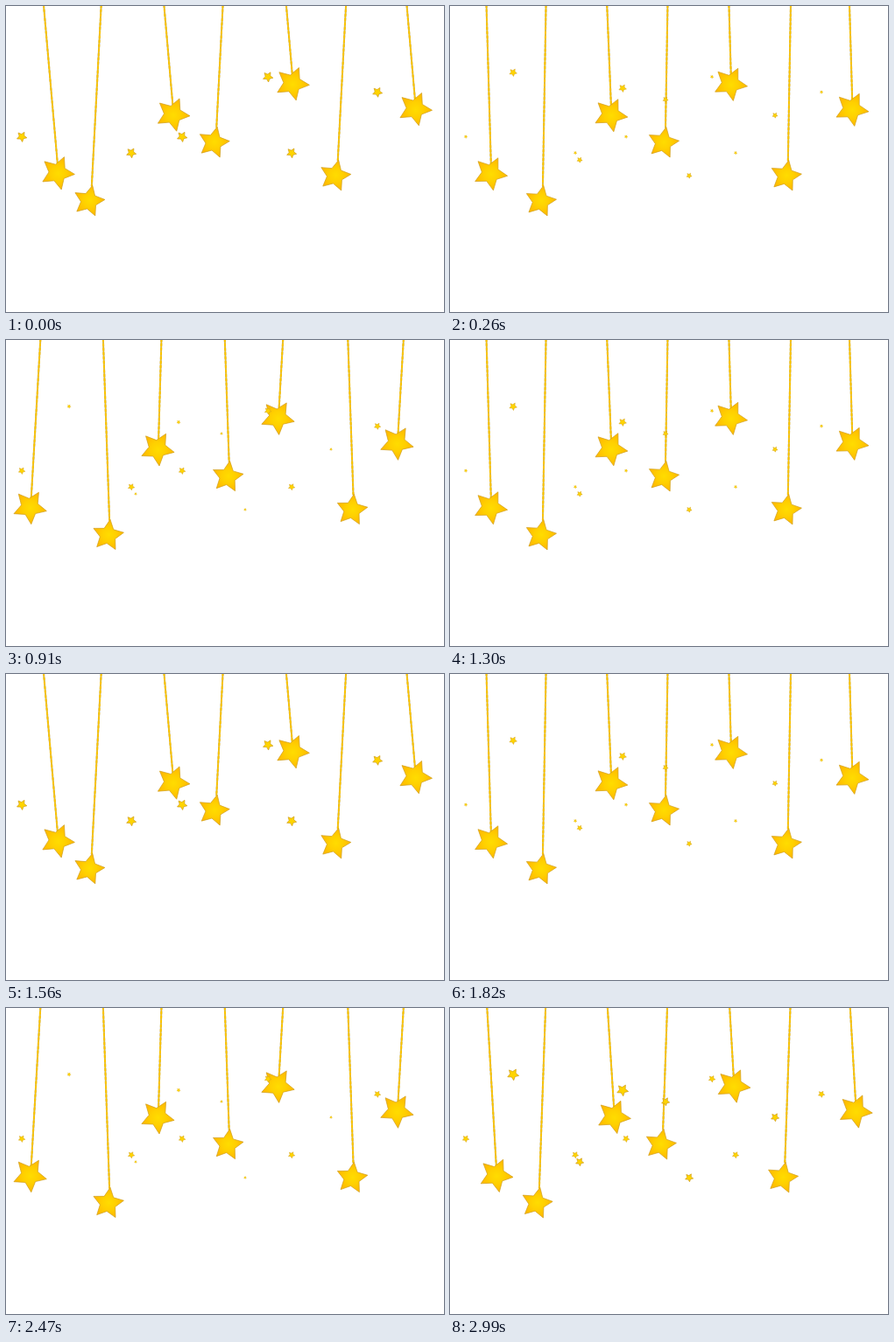
An HTML page for the animation above (3120 ms loop, 500 px wide and 350 px high).

```html
<!DOCTYPE html>
<html lang="en">
<head>
<meta charset="utf-8">
<title>Hanging stars</title>
<style>
  html, body { margin: 0; width: 100%; height: 100%; overflow: hidden; background: #fff; }
  svg { display: block; width: 500px; height: 350px; }
</style>
</head>
<body>
<svg id="stage" viewBox="0 0 500 350" width="500" height="350">
  <defs>
    <radialGradient id="gold">
      <stop offset="0" stop-color="#ffdc00"/>
      <stop offset="0.45" stop-color="#ffd000"/>
      <stop offset="1" stop-color="#ffb800"/>
    </radialGradient>
  </defs>
</svg>
<script>
const STEP = 130, STEPS = 24, PIVOT = -26;
const stage = document.getElementById('stage');

function add(parent, tag, attrs) {
  const el = document.createElementNS('http://www.w3.org/2000/svg', tag);
  for (const key in attrs) el.setAttribute(key, attrs[key]);
  parent.appendChild(el);
  return el;
}

function starPoints(r, turn) {
  return Array.from({ length: 10 }, (_, i) => {
    const a = (turn + i * 36) * Math.PI / 180;
    const d = i % 2 ? r * 0.5 : r;
    return (d * Math.sin(a)).toFixed(2) + ',' + (-d * Math.cos(a)).toFixed(2);
  }).join(' ');
}

function drawStar(parent, r, turn, fill, line) {
  return add(parent, 'polygon', {
    points: starPoints(r, turn), fill, stroke: '#cf9d1c', 'stroke-width': line
  });
}

// Two kinds of pendulum: wide stars swing right first, slim ones left
const wide = { r: 19.7, turn: 28, shift: -1, gap: 11 };
const slim = { r: 18.3, turn: 10, shift: -2.3, gap: 17 };

// kind, pivot x, star y, first and last angle
const pendulums = [
  [wide, 40.8, 191.5, 5, -5],
  [slim, 110, 223.5, -3, 3],
  [wide, 178.2, 124.5, 5, -3],
  [slim, 248.9, 156.5, -3, 3],
  [wide, 317.7, 89, 5, -5],
  [slim, 389.4, 194.5, -3, 3],
  [wide, 455.3, 118, 5, -5]
].map(([kind, x, y, from, to]) => {
  const el = add(stage, 'g', {});
  const len = y - PIVOT;
  const rope = { x1: 0, y1: 0, x2: 0, y2: len - kind.gap };
  add(el, 'line', { ...rope, stroke: '#b9ae90', 'stroke-width': 2 });
  add(el, 'line', { ...rope, stroke: '#ffc800', 'stroke-width': 1.2 });
  add(el, 'line', { ...rope, stroke: '#fbc400', 'stroke-width': 2, 'stroke-dasharray': '3 2' });
  const star = drawStar(el, kind.r, kind.turn, 'url(#gold)', 0.7);
  star.setAttribute('transform', `translate(${kind.shift} ${len})`);
  return { el, x, from, to };
});

function twinkles(list) {
  return list.map(([x, y, r]) => ({ el: drawStar(stage, r, 30, '#ffd400', 0.7), x, y }));
}

const shrinking = twinkles([
  [18, 149.5, 6], [143, 168, 5.8], [201, 149.5, 6],
  [299, 81, 6], [326, 168, 5.8], [424, 98.5, 5.8]
]);
const growing = twinkles([
  [72, 76, 6.8], [197, 94, 6.8], [246, 107, 4.8],
  [371, 125, 4.8], [148, 176, 4.8], [273, 194, 4.8]
]);

// 0 to 1 and back over the given number of steps
function wave(step, period) {
  const p = step % period / period;
  return 1 - Math.abs(1 - 2 * p);
}

function scaleAll(list, size) {
  for (const { el, x, y } of list) {
    el.setAttribute('transform', `translate(${x} ${y}) scale(${size})`);
    el.style.display = size > 0.01 ? '' : 'none';
  }
}

function render(ms) {
  const step = Math.floor(ms / STEP) % STEPS;
  const swing = wave(step, 12);
  for (const { el, x, from, to } of pendulums) {
    const angle = from + (to - from) * swing;
    el.setAttribute('transform', `translate(${x} ${PIVOT}) rotate(${-angle})`);
  }
  const glow = wave(step, 6);
  scaleAll(shrinking, 1 - glow);
  // the second group stays full until the loop restarts
  scaleAll(growing, step >= 21 ? 1 : glow);
}

const start = performance.now();
function tick() {
  render(performance.now() - start);
  requestAnimationFrame(tick);
}
tick();
</script>
</body>
</html>
```
